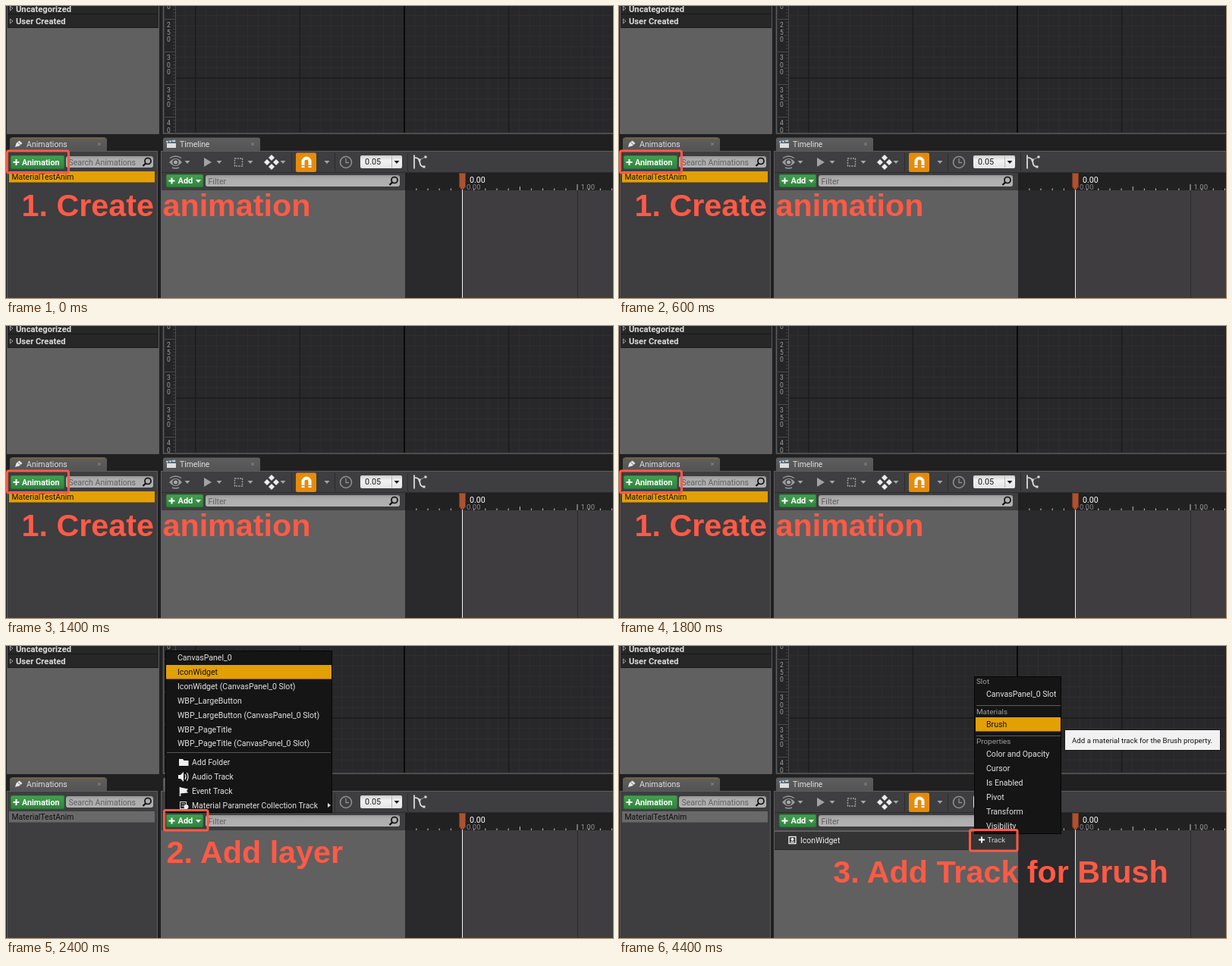
These frames come from a looping animation (800 px wide and 385 px high, 5200 ms). An HTML page:

```html
<!DOCTYPE html>
<html lang="en">
<head>
<meta charset="utf-8">
<title>Animate a material brush</title>
<style>
html, body { margin: 0; width: 100%; height: 100%; overflow: hidden; background: #202021; }
svg { display: block; width: 100%; height: 100%; }
text { font-family: Roboto, sans-serif; white-space: pre; }
.caption { font-family: "Liberation Sans", Arial, sans-serif; font-weight: bold; }
</style>
</head>
<body>
<svg id="stage" viewBox="0 0 800 385">
  <defs>
    <linearGradient id="green" x2="0" y2="1">
      <stop offset="0" stop-color="#43a150"/><stop offset="1" stop-color="#2f823d"/>
    </linearGradient>
    <linearGradient id="field" x2="0" y2="1">
      <stop offset="0" stop-color="#989898"/><stop offset=".3" stop-color="#adadad"/><stop offset="1" stop-color="#b2b2b2"/>
    </linearGradient>
    <linearGradient id="white" x2="0" y2="1">
      <stop offset="0" stop-color="#cfcfcf"/><stop offset=".4" stop-color="#f2f2f2"/><stop offset="1" stop-color="#e4e4e4"/>
    </linearGradient>
    <linearGradient id="tab" x2="0" y2="1">
      <stop offset="0" stop-color="#5f5e5f"/><stop offset="1" stop-color="#555455"/>
    </linearGradient>
  </defs>
</svg>
<script>
const NS = 'http://www.w3.org/2000/svg';
const stage = document.getElementById('stage');
const RED = '#ff5a46', ORANGE = '#e3a003', PANEL = '#3e3d3f', GREY = '#606060', EDGE = '#5d5c5e';
const LOOP = 5200, STARTS = [0, 2000, 4000];
let layer = stage;

function add(tag, attrs, content) {
  const el = document.createElementNS(NS, tag);
  for (const key in attrs) el.setAttribute(key, attrs[key]);
  if (content !== undefined) el.textContent = content;
  return layer.appendChild(el);
}
const rect = (x, y, width, height, fill, more) => add('rect', { x, y, width, height, fill, ...more });
const fill = (d, color) => add('path', { d, fill: color });
const line = (d, stroke, width = 1, more) =>
  add('path', { d, stroke, 'stroke-width': width, fill: 'none', ...more });
// Places a label by the middle of its capitals.
const label = (x, mid, text, color = '#e4e4e4', size = 10.55, more) =>
  add('text', { x, y: mid + size * .356, fill: color, 'font-size': size, ...more }, text);
const bold = { 'font-weight': 700 };

const plus = (x, y, r = 4) => line(`M${x - r} ${y}h${2 * r}M${x} ${y - r}v${2 * r}`, '#fff', 2);
const caret = (x, y, color = '#a5a5a5') => fill(`M${x - 3.5} ${y - 2}h7l-3.5 4z`, color);
const cross = (x, y) => line(`M${x - 2} ${y - 2}l4 4m0-4l-4 4`, '#858585');

function lens(x, y) {
  add('circle', { cx: x + 1, cy: y - 1, r: 4, fill: 'none', stroke: '#0c0c0c', 'stroke-width': 1.7 });
  line(`M${x - 2} ${y + 2}l-3.5 3.5`, '#0c0c0c', 2.2);
}
function button(x, y, w, h) {
  rect(x, y, w, h, 'url(#green)', { rx: 2, stroke: '#265f30', 'stroke-width': .8 });
}
function search(x, y, w, hint) {
  rect(x, y, w, 15, 'url(#field)', { rx: 3 });
  label(x + 3.5, y + 8, hint, '#606060');
  lens(x + w - 8, y + 7.5);
}
function tab(x, title) {
  fill(`M${x} 191V176.500q0-3 3-3h122q3 0 3 3v14.500z`, 'url(#tab)');
  label(x + 22, 182, title, '#e0e0e0', x < 100 ? 10.6 : 10.3);
  cross(x + 118, 182);
}
function frame(x, y, w, h) {
  rect(x, y, w, h, 'none', { rx: 2, stroke: RED, 'stroke-width': 3 });
}
function caption(x, y, text) {
  add('text', { x, y, class: 'caption', fill: RED, 'font-size': 41.3 }, text);
}
function menu(x, y, w, h) {
  rect(x + .5, y + .5, w - 1, h - 1, '#151516', { stroke: '#050505' });
}
function group() {
  layer = stage;
  layer = add('g');
}

function drawPalette() {
  rect(1, 0, 200, 168, GREY);
  rect(2, 0, 199, 28, '#272728');
  line('M2 10.500h199M2 28.500h199', '#19191a');
  line('M201.500 0V168.500H1', EDGE);
  [['Uncategorized', 3.5], ['User Created', 20.5]].forEach(([name, y]) => {
    label(13, y, name, '#dcdcdc', 11.2, bold);
    line(`M5.5 ${y - 3.5}v6l3.5-3z`, '#a5a5a5', .9);
  });
}

function drawCanvas() {
  rect(208, 0, 592, 167, '#282729');
  const step = 13.76;
  let minor = '', major = '';
  for (let i = -21; i <= 20; i++) {
    const x = 525 + i * step;
    const d = `M${x.toFixed(1)} 0V167`;
    if (i % 10) minor += d; else major += d;
  }
  for (let i = -6; i <= 5; i++) if (i) minor += `M224 ${(95 + i * step).toFixed(1)}H800`;
  line(minor, '#323133', .8);
  line(major + 'M224 95H800', '#1b1b1c', 1.3);
  line('M525 0V167', '#060606', 1.7);
  rect(208, 0, 15, 167, '#252426');
  line('M223.500 0V167', '#4b4b4b');
  for (let k = 0; k < 5; k++) {
    const top = 23 + 43 * (k - 1);
    line(`M209 ${top - 5.5}h14`, '#4b4b4b');
    for (let j = 1; j < 10; j++) line(`M${j === 5 ? 217 : 220} ${top - 5.5 + j * 4.3}H223`, '#4b4b4b', .8);
    [...String(200 + 50 * k)].forEach((digit, i) => {
      const y = top + 2 + i * 9.5;
      if (y < 164) label(212, y, digit, '#a0a0a0', 8.5);
    });
  }
  rect(205, 167, 595, 6, '#212122');
  line('M207.500 0V168H800', EDGE, 1.6);
}

function drawAnimations() {
  tab(5, 'Animations');
  line('M8 174h122', '#94772a');
  fill('M12 186l1.5-5 4-3.5 4 3.5-4 3.5z', '#e4e4e4');
  line('M16 180l3 3', '#555', .8);
  rect(1.5, 191.5, 198, 200, PANEL, { stroke: EDGE });
  button(6, 197, 71, 18);
  plus(13.5, 206);
  label(21, 206, 'Animation', '#fff', 10.75, bold);
  search(79, 198, 115, 'Search Animations');
}

function drawToolbar() {
  fill('M215 206q8.500-10 17 0q-8.500 10-17 0z', '#999');
  add('circle', { cx: 223.5, cy: 206, r: 4, fill: PANEL });
  add('circle', { cx: 223.5, cy: 206, r: 2.5, fill: '#aaa' });
  line('M216 200.500q7.500-5 15 0M219 213q4.500 2 9 0', '#999', 1.4);
  fill('M261 200v12l10-6z', '#a2a2a2');
  rect(301.5, 201, 10, 10, 'none', { stroke: '#a2a2a2', 'stroke-width': 1.4, 'stroke-dasharray': '2 1.3' });
  [[350, 200], [344, 206], [356, 206], [350, 212]].forEach(([x, y]) =>
    fill(`M${x} ${y - 4}l4 4-4 4-4-4z`, '#eee'));
  [239, 281, 322, 365, 423].forEach(x => caret(x, 206));
  line('M376.500 194v24M433.500 194v24M529.500 194v24', '#2c2c2d');

  rect(382, 193.5, 27, 25.5, '#e78b08', { rx: 2 });
  line('M391.500 213v-8a4.500 4.500 0 0 1 9 0v8', '#fff', 4);
  line('M389 210.500h5m4 0h5', '#e78b08', 1.2);

  add('circle', { cx: 448, cy: 206, r: 7.5, fill: 'none', stroke: '#8f8f8f', 'stroke-width': 1.6 });
  line('M448 201v5.500h4', '#8f8f8f', 1.3);

  rect(467, 197, 55, 17, 'url(#white)', { rx: 2 });
  label(473, 205.5, '0.05', '#1a1a1a', 10.8);
  line('M508.500 198v15', '#b5b5b5');
  caret(515, 206, '#222');

  line('M538 196.500v18M539 200c10 0 3 12 12 12', '#e4e4e4', 1.7);
  line('M545 203l8-4', '#9c9c9c');
  [[545, 203], [551, 212], [553, 199]].forEach(([x, y]) => rect(x - 1.5, y - 1.5, 3, 3, '#dcdcdc'));
}

function drawTimeline() {
  tab(207, 'Timeline');
  rect(212, 181, 12, 6, '#dedede');
  fill('M211 178l12-1.500 .5 2.500-12 1.500z', '#a9cbdc');
  line('M214 178l1 2.500m3-3l1 2.500', '#334');

  rect(204.5, 191.5, 600, 200, PANEL, { stroke: EDGE });
  rect(204, 243, 322, 142, GREY);
  line('M205 219.500h595', '#2b2b2c');
  drawToolbar();

  button(211, 222, 49, 17);
  plus(218.5, 230.5);
  label(226.5, 230.5, 'Add', '#fff', 11, bold);
  caret(253.5, 231, '#fff');
  search(263, 223, 256, 'Filter');

  rect(526, 220, 274, 23, '#212122');
  rect(526, 243, 75, 142, '#2a292b');
  rect(601, 243, 199, 142, '#3f3d40');
  line('M753.500 243V385', '#2b2a2c');
  for (let i = -4; i <= 13; i++) {
    const x = 601.5 + i * 15.15;
    const size = i % 10 === 0 ? 8 : i % 5 === 0 ? 5 : 2.5;
    line(`M${x.toFixed(1)} 243v${-size}`, '#c5c5c5');
  }
  label(607, 238.5, '0.00', '#858585', 9.5);
  label(757.5, 238.5, '1.00', '#959595', 9.5);
  fill('M597 220h9v18l-3 4h-3l-3-4z', '#ac5231');
  line('M597.500 220.500h8v17.500l-2.500 3.500h-3l-2.500-3.500z', '#743720');
  line('M601.500 242V385', '#f0f0f0');
  label(611, 229.5, '0.00', '#fff', 10.6);
}

function animationRow(color) {
  rect(4, 218, 192, 14.5, color);
  label(7.5, 225, 'MaterialTestAnim', '#0d0d0d', 10.4);
}

function drawCreate() {
  animationRow(ORANGE);
  frame(1.5, 191, 81, 29);
  caption(20.5, 277.3, '1. Create animation');
}

function drawAddLayer() {
  animationRow('#6a696a');
  menu(210, 6, 220, 214);
  rect(211, 25, 218, 18.5, ORANGE);
  const slot = ' (CanvasPanel_0 Slot)';
  ['CanvasPanel_0', 'IconWidget', 'IconWidget' + slot, 'WBP_LargeButton', 'WBP_LargeButton' + slot,
    'WBP_PageTitle', 'WBP_PageTitle' + slot].forEach((name, i) =>
    label(226, 15.5 + i * 18.85, name, i === 1 ? '#111' : '#e4e4e4'));
  line('M212 140.500h216', '#555');
  ['Add Folder', 'Audio Track', 'Event Track', 'Material Parameter Collection Track'].forEach((name, i) =>
    label(245, 153.5 + i * 18.85, name, '#e4e4e4', 10.45));
  fill('M228 149h5l1.500 2h6v7h-12.500z', '#eee');
  fill('M227 170h3l4-4v13l-4-4h-3z', '#eee');
  line('M236 169q2 3.500 0 7m2.500-9q3 5.500 0 11', '#eee', 1.1);
  line('M229.500 186v12', '#eee', 1.6);
  fill('M230 186.500l10 2-2 2.500 2 2.500-10 1z', '#eee');
  rect(229.5, 205.5, 8, 9, 'none', { stroke: '#ddd' });
  line('M231 208h5m-5 3h4', '#ddd');
  add('circle', { cx: 237.5, cy: 212, r: 3, fill: '#eee' });
  fill('M424 207v6l4-3z', '#ddd');
  frame(208.5, 216.5, 57.5, 26.5);
  caption(211.5, 286.3, '2. Add layer');
}

function drawAddTrack() {
  animationRow('#6a696a');
  rect(205, 245, 321, 23, '#343435');
  line('M205 268.500h321', '#262627');
  rect(224, 251.5, 9, 9, 'none', { stroke: '#eee', 'stroke-width': 1.4 });
  add('circle', { cx: 228.5, cy: 255, r: 2, fill: '#eee' });
  line('M226 258.500h5', '#eee', 1.3);
  label(239, 256, 'IconWidget', '#eee', 10.4);
  plus(478, 255.5);
  label(485.5, 255.5, 'Track', '#d5d5d5', 9.7);

  menu(468, 40, 115, 208);
  rect(470, 94, 112, 18.5, ORANGE);
  line('M471 78.500h111M471 118.500h111', '#5c5c5c');
  [['Slot', 46.5], ['Materials', 86.5], ['Properties', 125.5]].forEach(([name, y]) =>
    label(471, y, name, '#a0a0a0', 9.9));
  label(484, 63.5, 'CanvasPanel_0 Slot');
  label(484, 103, 'Brush', '#111');
  ['Color and Opacity', 'Cursor', 'Is Enabled', 'Pivot', 'Transform', 'Visibility'].forEach((name, i) =>
    label(484, 142.5 + i * 18.85, name));

  rect(587.5, 110.5, 205, 27, '#f1f1f1', { stroke: '#1a1a1a' });
  label(597, 124.5, 'Add a material track for the Brush property.', '#111', 9.7);
  frame(462.5, 242.5, 62.5, 27.5);
  caption(282.3, 311.7, '3. Add Track for Brush');
}

group();
drawPalette();
drawCanvas();
drawAnimations();
drawTimeline();

const steps = [drawCreate, drawAddLayer, drawAddTrack].map(draw => {
  group();
  draw();
  return layer;
});

function render(time) {
  const t = time % LOOP;
  const current = STARTS.filter(start => t >= start).length - 1;
  steps.forEach((g, i) => g.setAttribute('visibility', i === current ? 'visible' : 'hidden'));
}

const began = performance.now();
function tick() {
  render(performance.now() - began);
  requestAnimationFrame(tick);
}
tick();
</script>
</body>
</html>
```
